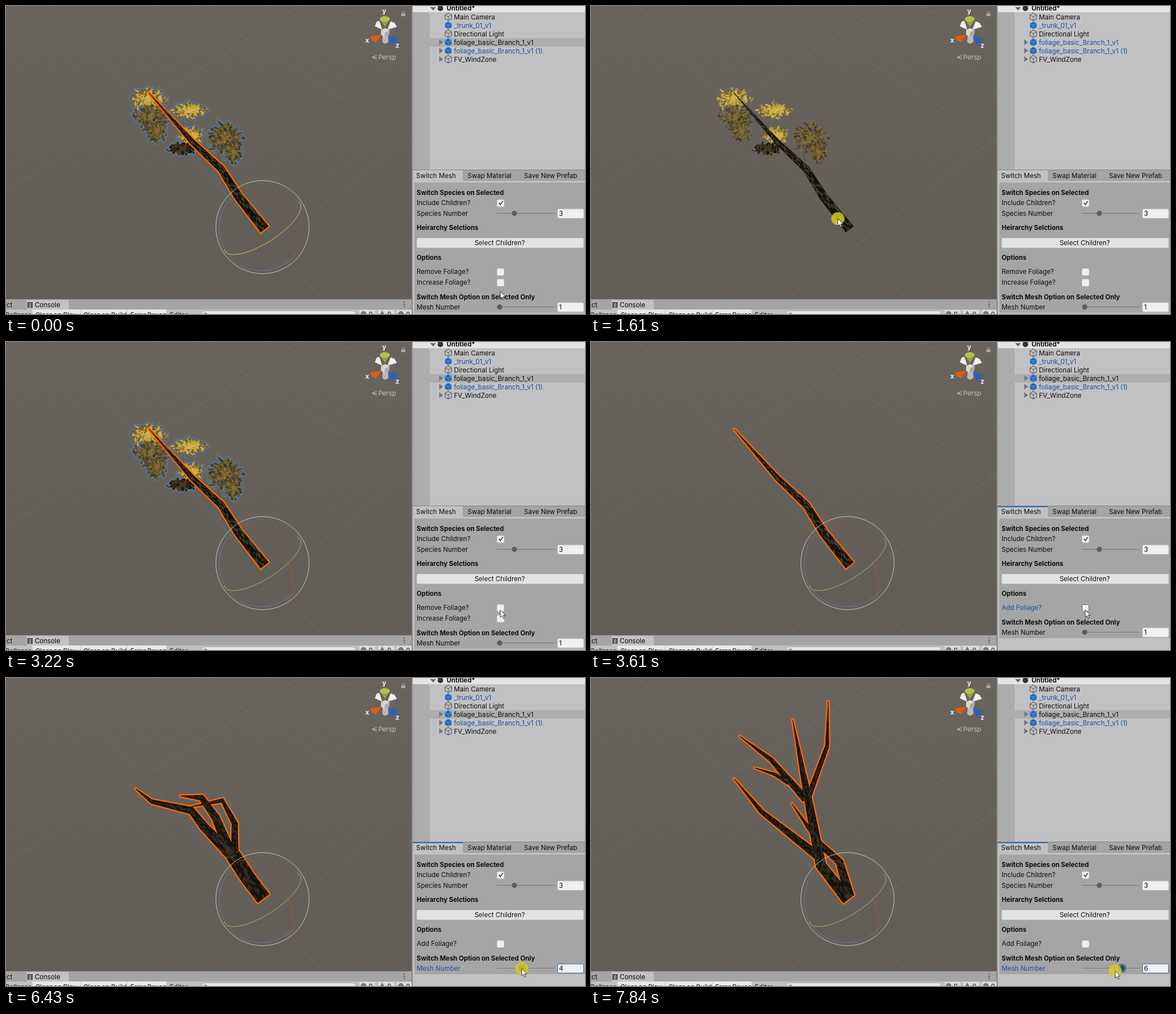
Animation of 1025x546 px, one loop 8 s. Source, as an HTML page with a canvas:

```html
<!DOCTYPE html>
<html lang="en">
<head>
<meta charset="utf-8">
<title>Switch Mesh</title>
<style>
html, body { margin: 0; width: 100%; height: 100%; overflow: hidden; background: #655f5a; }
canvas { display: block; }
</style>
</head>
<body>
<canvas id="stage" width="1025" height="546"></canvas>
<script>
const ctx = document.getElementById('stage').getContext('2d');
const LOOP = 8000, STEP = 201;
const INK = '#0d0d0d', BLUE = '#1c4f9c', ORANGE = '#ff6a05';
const TAU = Math.PI * 2;

const mix = (a, b, t) => a + (b - a) * t;
const ease = t => t * t * (3 - 2 * t);

// Pointer travel: first step, last step and destination.
const MOVES = [
  [0, 3, 515, 233], [5, 8, 437, 377], [10, 11, 636, 377], [11, 16, 875, 475],
  [26, 30, 876, 514], [30, 32, 913, 515], [32, 38, 941, 519], [38, 39, 928, 519]
];

function pointerAt(step) {
  let x = 875, y = 506;
  for (const [first, last, toX, toY] of MOVES) {
    const t = ease(Math.min(1, Math.max(0, (step - first) / (last - first))));
    x = mix(x, toX, t);
    y = mix(y, toY, t);
  }
  return { x, y };
}

function stateAt(time) {
  const step = Math.floor((time + 14) / STEP);
  const dragging = step >= 30;
  return {
    ...pointerAt(step),
    press: step === 5 || step === 8 || step === 17 || dragging,
    selected: step < 6 || step >= 9,
    foliage: step < 18,
    hot: step < 6 ? 'y' : step === 11 ? 'outer' : '',
    focus: dragging ? 'mesh' : step >= 17 ? 'foliage' : '',
    mesh: step < 31 ? 1 : step < 37 ? 4 : 6
  };
}

function randomizer(seed) {
  return () => {
    seed = (seed * 1664525 + 1013904223) % 4294967296;
    return seed / 4294967296;
  };
}

function rect(x, y, w, h, color) {
  ctx.fillStyle = color;
  ctx.fillRect(x, y, w, h);
}

function box(x, y, w, h, fill, border, radius = 2) {
  ctx.beginPath();
  ctx.roundRect(x + 0.5, y + 0.5, w - 1, h - 1, radius);
  ctx.fillStyle = fill;
  ctx.fill();
  ctx.strokeStyle = border;
  ctx.lineWidth = 1;
  ctx.stroke();
}

function arc(color, x, y, rx, ry, tilt = 0, from = 0, to = TAU) {
  ctx.beginPath();
  ctx.ellipse(x, y, rx, ry, tilt, from, to);
  ctx.strokeStyle = color;
  ctx.lineWidth = 1;
  ctx.stroke();
}

function disc(x, y, r, color, ry = r) {
  ctx.beginPath();
  ctx.ellipse(x, y, r, ry, 0, 0, TAU);
  ctx.fillStyle = color;
  ctx.fill();
}

function trace(p) {
  ctx.beginPath();
  for (let i = 0; i < p.length; i += 2) ctx.lineTo(p[i], p[i + 1]);
}

function poly(color, ...p) {
  trace(p);
  ctx.fillStyle = color;
  ctx.fill();
}

function line(color, width, ...p) {
  trace(p);
  ctx.strokeStyle = color;
  ctx.lineWidth = width;
  ctx.stroke();
}

function text(value, x, y, { bold = false, color = INK, size = 11.6, align = 'left' } = {}) {
  ctx.font = `${bold ? 'bold ' : ''}${bold ? size - 0.15 : size}px Inter, sans-serif`;
  ctx.textAlign = align;
  ctx.fillStyle = color;
  ctx.fillText(value, x, y + 4.2);
}

// A limb runs through its joints from base to tip; a taper of 0 keeps it even.
function limb(width, taper, ...joints) {
  const lengths = [0];
  for (let i = 1; i < joints.length; i++) {
    const [ax, ay] = joints[i - 1], [bx, by] = joints[i];
    lengths.push(lengths[i - 1] + Math.hypot(bx - ax, by - ay));
  }
  const total = lengths.at(-1);
  const left = [], right = [];
  const marks = new Path2D(), rand = randomizer(Math.round(total * 97));
  const widthAt = d => 1 + (width - 1) * (1 - d / total) ** taper;

  joints.forEach(([x, y], i) => {
    const a = joints[Math.max(0, i - 1)], b = joints[Math.min(joints.length - 1, i + 1)];
    const angle = Math.atan2(b[1] - a[1], b[0] - a[0]), half = widthAt(lengths[i]) / 2;
    const nx = Math.sin(angle) * half, ny = -Math.cos(angle) * half;
    left.push([x + nx, y + ny]);
    right.unshift([x - nx, y - ny]);
    if (!i) return;
    for (let d = lengths[i - 1]; d < lengths[i]; d += 1.8) {
      const t = (d - lengths[i - 1]) / (lengths[i] - lengths[i - 1]);
      const w = widthAt(d), side = (rand() - 0.5) * w * 0.8, r = 0.6 + rand() * w * 0.11;
      const px = mix(a[0], x, t) + side, py = mix(a[1], y, t) - side * 0.6;
      marks.moveTo(px, py);
      marks.ellipse(px, py, r * 2, r * 0.8, angle + rand() - 0.5, 0, TAU);
    }
  });
  const shape = new Path2D();
  left.concat(right).forEach(p => shape.lineTo(...p));
  shape.closePath();
  return { shape, marks };
}

const MESHES = {
  1: [limb(18, 0.7, [458, 396], [411, 337], [381, 289], [330, 241], [253, 154])],
  4: [
    limb(26, 0, [456, 391], [428, 354], [402, 314]),
    limb(20, 0.6, [403, 318], [350, 263], [328, 235], [258, 219], [229, 196]),
    limb(18, 0.35, [400, 316], [371, 247], [346, 212], [308, 209]),
    limb(13, 0.5, [405, 308], [405, 258], [383, 217], [324, 229])
  ],
  6: [
    limb(21, 0.5, [455, 393], [407, 332], [383, 208], [357, 74]),
    limb(17, 0.6, [458, 388], [440, 326], [405, 294], [355, 222]),
    limb(16, 0.7, [406, 319], [302, 237], [253, 178]),
    limb(10, 0.5, [386, 208], [418, 121], [420, 41]),
    limb(14, 0.7, [380, 215], [319, 145], [263, 103]),
    limb(8, 0.7, [350, 186], [326, 171], [289, 159])
  ]
};

const GOLD = ['#7e6a2b', '#b4953a', '#d0b24d'];
const OLIVE = ['#3c331e', '#5e4f2a', '#806c35'];
const DARK = ['#0e0c08', '#1b1812', '#453a22'];

// A spray of leafy twigs fanning out from one point.
function spray(cx, cy, rx, ry, colors) {
  const rand = randomizer(cx * 131 + cy);
  const layers = colors.map(() => new Path2D()), outline = new Path2D();
  const twigs = Math.round(9 + rx * 0.45);
  for (let k = 0; k < twigs; k++) {
    const angle = (k + rand()) / twigs * TAU, reach = 0.7 + rand() * 0.38;
    const leaves = 4 + Math.hypot(rx, ry) * 0.2;
    for (let i = 0; i < leaves; i++) {
      const t = (i + rand()) / leaves * reach;
      const x = cx + Math.cos(angle) * rx * t + rand() * 6 - 3;
      const y = cy + Math.sin(angle) * ry * t + rand() * 6 - 3;
      const leaf = new Path2D();
      leaf.ellipse(x, y, 1.8 + rand() * 2.4, 0.7 + rand() * 0.9, angle + rand() * 2 - 1, 0, TAU);
      layers[Math.floor(rand() ** 1.3 * 3)].addPath(leaf);
      outline.addPath(leaf);
    }
  }
  return { layers, outline, colors };
}

const SPRAYS = [
  spray(257, 196, 30, 23, OLIVE),
  spray(267, 221, 16, 21, OLIVE),
  spray(251, 164, 32, 16, GOLD),
  spray(326, 185, 32, 14, GOLD),
  spray(313, 252, 27, 11, DARK),
  spray(329, 230, 24, 15, GOLD),
  spray(388, 233, 33, 29, OLIVE),
  spray(403, 259, 15, 19, OLIVE)
];

function drawFoliage(selected) {
  if (selected) {
    for (const [color, width] of [['#587ba6', 5], ['#575143', 2]]) {
      ctx.strokeStyle = color;
      ctx.lineWidth = width;
      SPRAYS.forEach(s => ctx.stroke(s.outline));
    }
  }
  line('#5b4c36', 1.4, 380, 282, 376, 262, 390, 228);
  line('#5b4c36', 1.2, 317, 216, 292, 205, 264, 200);
  for (const { layers, colors } of SPRAYS) {
    layers.forEach((path, i) => {
      ctx.fillStyle = colors[i];
      ctx.fill(path);
    });
  }
}

function drawMesh(limbs, selected, barkColor) {
  ctx.lineJoin = 'round';
  if (selected) {
    ctx.strokeStyle = ORANGE;
    ctx.lineWidth = 4.6;
    limbs.forEach(l => ctx.stroke(l.shape));
  }
  ctx.fillStyle = '#15120e';
  limbs.forEach(l => ctx.fill(l.shape));
  for (const { shape, marks } of limbs) {
    ctx.save();
    ctx.clip(shape);
    ctx.fillStyle = barkColor;
    ctx.fill(marks);
    ctx.restore();
  }
}

// Parallel ground lines meet the stage's top and bottom at even spacing.
function gridLines(top, topGap, bottom, bottomGap) {
  for (let i = -10; i <= 20; i++) {
    const t = i / 10;
    line(i % 10 ? 'rgba(150,150,142,.05)' : 'rgba(140,150,142,.22)', 1,
      top + topGap * t, 0, bottom + bottomGap * t, 519);
  }
}

function drawGround() {
  const shade = ctx.createLinearGradient(0, 0, 0, 519);
  shade.addColorStop(0, '#69635e');
  shade.addColorStop(1, '#635d57');
  rect(0, 0, 718, 519, shade);
  gridLines(84, 248, 559, 608);
  gridLines(1017, -497, 348, -648);
}

function drawHandles(hot) {
  const x = 454, y = 392, half = Math.PI;
  arc(hot === 'outer' ? '#b5c08c' : '#c2c2c0', x, y, 82.5, 82.5);
  arc(hot === 'y' ? '#85583e' : '#a75836', x, y, 79, 40, 0.99, half, TAU);
  arc('#6179a4', x, y, 76, 78, 0.67, 0, half);
  arc(hot === 'y' ? '#c9c55a' : '#9dbb61', x, y, 79, 28, -0.57, -0.15, half + 0.1);
}

function drawAxes() {
  poly('#bbb9b6', 667, 50, 676, 50, 677, 64, 671, 67, 666, 64);
  poly('#f0f0ef', 666, 42, 653, 36, 656, 28, 661, 26);
  poly('#f0f0ef', 675, 42, 681, 27, 688, 30, 692, 37);
  poly('#93a43c', 662, 24, 679, 24, 671, 37);
  disc(670.5, 23, 8.7, '#adc64a', 5);
  poly('#e35a12', 664, 51, 645, 54, 645, 59, 655, 65);
  poly('#2a63bd', 677, 52, 694, 59, 691, 66, 681, 68);
  poly('#d7d7d6', 664, 43, 671, 39, 679, 43, 678, 52, 670, 55, 664, 51);
  poly('#a9a9a8', 671, 47, 679, 43, 678, 52, 670, 55);
  const label = { bold: true, color: '#eeeeec', align: 'center', size: 12 };
  text('y', 669.5, 9, label);
  text('x', 639.5, 61, label);
  text('z', 693, 70, label);
  text('Persp', 659, 91, { color: '#c4c2bf' });
  line('#c4c2bf', 1, 657, 87, 648, 91, 657, 95);
  line('#c4c2bf', 1, 648, 91, 657, 91);
  rect(700, 13, 7, 5, '#aaa7a3');
  arc('#aaa7a3', 703.5, 12.5, 2.4, 2.4, 0, Math.PI, TAU);
}

function drawConsole() {
  rect(0, 519, 719, 27, '#a5a5a5');
  rect(0, 519, 719, 1, '#6d6a67');
  rect(37, 521, 74, 17, '#c1c1c1');
  text('ct', 1, 530);
  rect(38, 525, 9, 10, '#444');
  for (let y = 527; y < 534; y += 2) rect(40, y, 5, 1, '#c1c1c1');
  text('Console', 51, 530);
  for (let y = 525; y <= 533; y += 4) disc(705, y, 1.1, '#444');
  rect(0, 538, 719, 8, '#c1c1c1');
  let x = -7;
  for (const [label, width, on] of [['Collapse', 54], ['Clear on Play', 85, true],
    ['Clear on Build', 83, true], ['Error Pause', 70, true], ['Editor', 55]]) {
    rect(x, 538, width - 1, 8, on ? '#e8e8e8' : '#c1c1c1');
    text(label, x + 5, 548);
    x += width;
  }
  box(346, 540, 274, 14, '#e8e8e8', '#aaa', 6);
  arc('#555', 353, 547, 3, 3);
  for (let i = 0; i < 3; i++) {
    const left = 626 + i * 33;
    rect(left, 539, 28, 7, '#dcdcdc');
    if (i === 1) poly('#777', left + 7, 540, left + 13, 550, left + 1, 550);
    else disc(left + 7, 546, 5, '#777');
    text('0', left + 16, 547);
  }
}

function cube(x, y, filled) {
  const hull = [];
  for (let a = 0; a <= 6; a++) hull.push(x + 6.7 * Math.sin(a * TAU / 6), y - 6.7 * Math.cos(a * TAU / 6));
  const edge = filled ? '#5e9ce0' : '#55585b';
  poly(filled ? '#2468bd' : '#c1c1c3', ...hull);
  if (!filled) line(edge, 1.1, ...hull);
  line(edge, 1, x - 6, y - 3.3, x, y - 0.3, x + 6, y - 3.3);
  line(edge, 1, x, y - 0.3, x, y + 6.5);
}

const OBJECTS = ['Main Camera', '_trunk_01_v1', 'Directional Light',
  'foliage_basic_Branch_1_v1', 'foliage_basic_Branch_1_v1 (1)', 'FV_WindZone'];

function drawHierarchy(selected) {
  rect(718, 0, 307, 292, '#c1c1c3');
  rect(720, 0, 30, 290, '#adadae');
  rect(720, 0, 305, 11, '#e4e4e4');
  if (selected) rect(720, 57, 305, 15, '#aeaeae');
  poly('#666', 751, 2, 761, 2, 756, 8);
  disc(769, 4, 5, '#333');
  text('Untitled*', 780, 4, { bold: true });
  OBJECTS.forEach((name, i) => {
    const y = 19.3 + i * 15, prefab = name.includes('_v1');
    if (i >= 3) poly('#757577', 767, y - 5, 774, y, 767, y + 5);
    cube(783, y, prefab);
    text(name, 793, y, { color: prefab && !(i === 3 && selected) ? BLUE : INK });
  });
}

function checkbox(y, checked, focused) {
  box(869, y - 6, 13, 13, '#efefef', focused ? '#2f6cb0' : '#dadada');
  if (checked) line('#333', 1.6, 872.5, y, 875, y + 3, 879.5, y - 3);
}

function slider(y, x, value, focused) {
  rect(869, y - 0.5, 103, 1, '#777');
  if (focused) disc(x, y, 8, '#4b76a8');
  disc(x, y, 4.6, focused ? '#35424f' : '#5c5c5c');
  box(976, y - 8, 47, 17, '#f0f0f0', focused ? '#2f6cb0' : '#d0d0d0');
  text(value, 979, y + 0.5);
}

function drawPanel({ foliage, focus, mesh }) {
  rect(718, 290, 307, 256, '#c1c1c1');
  rect(720, 290, 305, 20, '#a4a4a4');
  rect(720, 290, 305, 1, '#858585');
  rect(720, 291, 89, 19, '#c1c1c1');
  if (focus) rect(720, 291, 89, 2, '#3a72b0');
  text('Switch Mesh', 726, 300.5);
  text('Swap Material', 817, 300.5);
  text('Save New Prefab', 917, 300.5);
  rect(723, 313, 302, foliage ? 231 : 212, '#a5a5a5');

  const heading = (value, y) => text(value, 727, y, { bold: true });
  const label = (value, y, active) => text(value, 727, y, { color: active ? BLUE : INK });
  heading('Switch Species on Selected', 331);
  label('Include Children?', 349);
  checkbox(349, true);
  label('Species Number', 367.5);
  slider(367.5, 900, '3');
  heading('Heirarchy Selctions', 393);
  box(727, 411, 296, 18, '#e2e2e2', '#cfcfcf');
  text('Select Children?', 874, 419.5, { align: 'center' });
  heading('Options', 446);
  label(foliage ? 'Remove Foliage?' : 'Add Foliage?', 471, focus === 'foliage');
  checkbox(471, false, focus === 'foliage');
  if (foliage) {
    label('Increase Foliage?', 490);
    checkbox(490);
  }
  const y = foliage ? 516 : 497;
  heading('Switch Mesh Option on Selected Only', y);
  label('Mesh Number', y + 17.5, focus === 'mesh');
  slider(y + 17.5, 874 + (mesh - 1) * 13.2, String(mesh), focus === 'mesh');
}

function drawCursor({ x, y, press }) {
  if (press) disc(x, y, 11.5, 'rgba(212,205,34,.84)');
  const arrow = new Path2D(`M${x} ${y}v13l3-2.8 2 4.6 2.1-.9-2-4.5h4.1z`);
  ctx.fillStyle = '#fff';
  ctx.fill(arrow);
  ctx.strokeStyle = '#222';
  ctx.lineWidth = 0.9;
  ctx.stroke(arrow);
}

function draw(time) {
  const state = stateAt(time);
  drawGround();
  if (state.foliage) drawFoliage(state.selected);
  drawMesh(MESHES[state.mesh], state.selected,
    state.mesh === 1 ? 'rgba(122,116,94,.42)' : 'rgba(95,86,68,.36)');
  if (state.selected) drawHandles(state.hot);
  drawAxes();
  drawConsole();
  drawHierarchy(state.selected);
  drawPanel(state);
  rect(718, 0, 2, 546, '#8a8887');
  drawCursor(state);
}

const begin = performance.now();
function tick() {
  draw((performance.now() - begin) % LOOP);
  requestAnimationFrame(tick);
}
tick();
</script>
</body>
</html>
```
